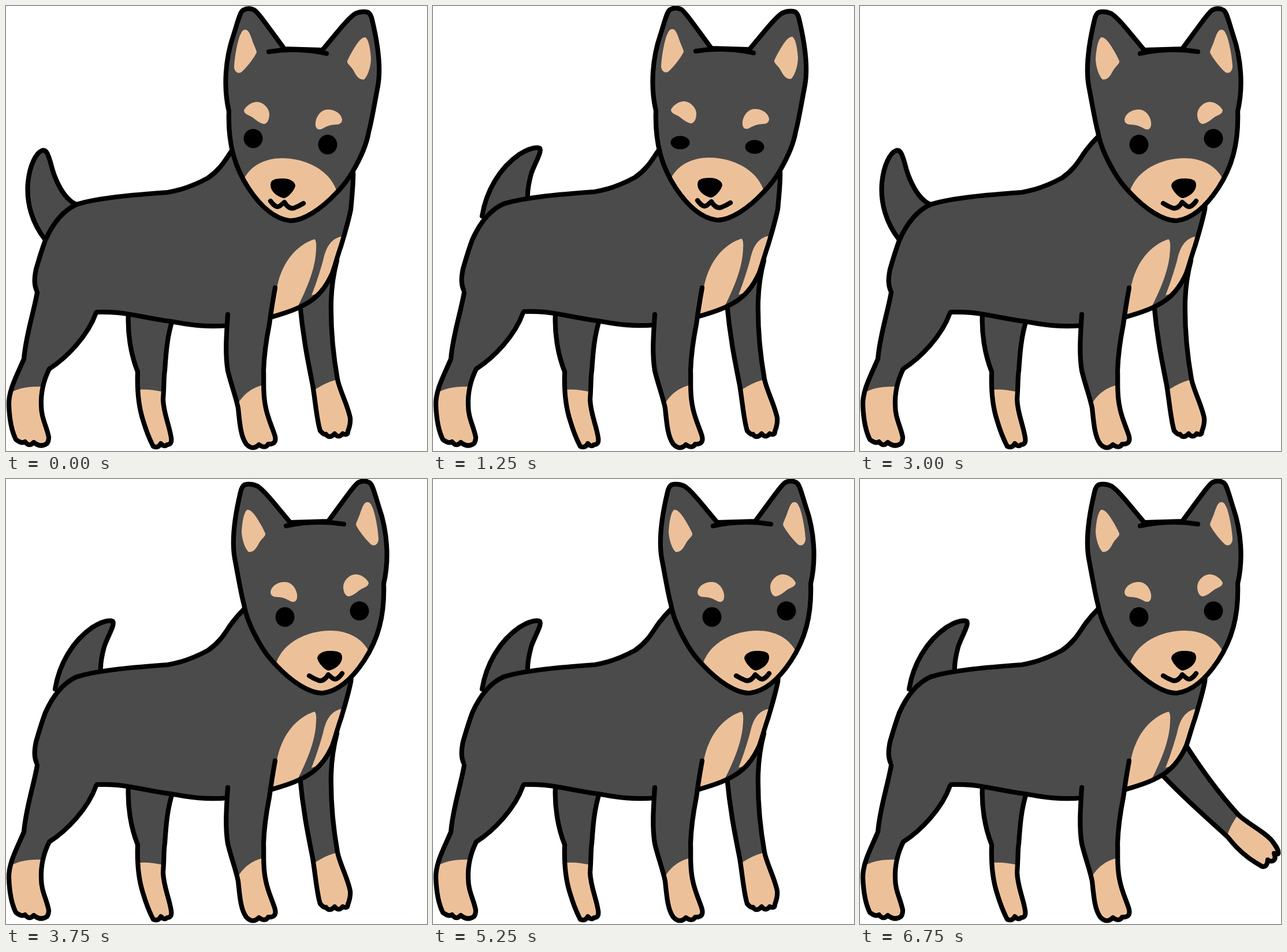
An HTML page that plays this animation: 729 px wide and 769 px high, repeating every 7 s.

```html
<!DOCTYPE html>
<html lang="en">
<head>
<meta charset="utf-8">
<title>Dog</title>
<style>
  html, body { margin: 0; width: 100%; height: 100%; overflow: hidden; background: #fff; }
  svg { display: block; width: 729px; height: 769px; }
  .coat { fill: #4b4b4b; }
  .tan { fill: #ecc19a; }
  .line { fill: none; stroke: #000; stroke-width: 8.2; stroke-linecap: round; stroke-linejoin: round; }
</style>
</head>
<body>
<svg id="stage" viewBox="0 0 729 769"></svg>
<script>
const LOOP = 7000, STEP = 250;
let clips = 0;

// One outlined part: coat fill (plus an unstroked extension), tan markings clipped to it, outline.
function part(d, tan = '', extra = '') {
  const id = 'clip' + clips++;
  return `<clipPath id="${id}"><path d="${d}${extra}z"/></clipPath>
    <path class="coat" d="${d}${extra}z"/>
    <path class="tan" clip-path="url(#${id})" d="${tan}"/>
    <path class="line" d="${d}"/>`;
}

const group = (id, content) => `<g id="${id}">${content}</g>`;
const eye = (x, y, ry) => `<ellipse cx="${x}" cy="${y}" rx="16.5" ry="${ry}"/>`;

const tailDown = part(`M68,404C45,375 35,340 38,305C41,275 52,254 62,250C70,247 73,257 77,270
  C84,300 100,335 124,344`);
const tailUp = part(`M85,363C92,320 115,280 150,256C165,247 178,243 185,246C189,252 176,272 170,290
  C166,305 163,318 164,332`);

const farHindLeg = part(`M212,530C210,565 216,602 228,632C227,660 229,690 237,715
  C243,735 248,748 255,761Q264,765 268,756Q274,763 279,758Q288,758 286,746
  C283,725 273,705 272,680C274,655 273,640 275,630C277,600 279,570 289,540`,
  'M220,664Q250,660 280,669L300,700V769H220z');

const farForeLeg = part(`M509,515C514,570 522,610 531,655C536,685 538,715 544,734
  Q551,742 554,740Q560,749 569,739Q576,748 583,739Q592,743 592,735Q597,722 596,712
  C592,690 578,665 574,645C566,600 562,560 563,510C564,480 569,455 573,440`,
  'M525,670C545,655 560,648 584,643L620,700V769H525z');

const raisedLeg = part(`M560,453C588,498 625,548 656,581C672,596 703,611 714,626
  C720,634 726,642 724,648L717,647C722,658 714,664 706,658C706,667 701,672 695,669
  C687,664 680,660 672,654C655,641 646,630 637,619C598,583 558,549 522,510`,
  'M633,628Q638,600 659,575L729,600V700H630z');

const body = part(`M54,494C48,482 49,470 52,455C57,438 61,424 68,405C80,378 98,354 122,343
  C160,331 225,326 280,322C305,318 328,309 350,297C372,282 380,265 391,250Q400,238 412,226
  L601,287Q602,300 597,352C592,376 586,395 580,415C574,432 570,448 565,462C556,482 545,497 530,508
  C512,521 490,529 458,538L385,552C340,556 310,549 285,545C255,541 235,536 215,533Q190,528 157,529`,
  `M534,403C495,416 472,455 467,500L455,545L505,520C525,480 536,450 537,420Q538,405 534,403z
   M584,398C562,400 553,420 549,440C542,465 535,485 529,500L560,490L600,400z`,
  'L120,550L72,520');

const nearHindLeg = part(`M54,495C48,530 34,570 31,610C18,640 4,665 5,690C6,715 10,735 17,749
  Q27,757 33,753Q40,763 48,754Q60,764 71,756Q74,752 74,745C70,725 61,712 61,690
  C60,665 66,645 75,627C105,608 142,570 156,530`,
  'M0,672C20,660 42,655 75,659L90,700V769H0z', 'L150,505L62,482');

const nearForeLeg = part(`M384,533C382,565 379,600 384,630C390,655 398,675 402,695
  C405,725 407,745 416,757Q427,769 438,758Q449,766 454,757Q469,758 466,744
  C463,732 454,715 450,695C444,670 447,650 446,630C447,600 451,575 456,550Q460,520 466,487`,
  'M398,692C412,670 425,658 455,653L480,700V769H398z');

const skull = `M386,182C376,140 380,90 394,50C402,25 405,10 411,7Q420,2 430,7C437,11 458,42 482,74
  L548,76C570,50 592,21 605,13Q617,8 627,11Q632,14 634,24C645,70 649,110 644,138
  C637,175 633,200 628,218C624,242 612,266 601,285C593,299 584,311 573,322
  C545,352 515,371 492,371C465,368 440,345 420,315C397,280 384,240 386,182`;

const muzzle = 'M410,303C422,275 450,263 478,263C520,263 560,284 572,318L580,390H400z';

const markings = `M413,41C419,40 422,46 426,58C429,68 434,76 434,80C430,90 415,108 408,114
  C402,118 396,114 395,106C396,85 402,55 407,47Q409,42 413,41z
  M622,54C628,57 631,75 632,90C632,105 626,122 620,127C612,128 607,122 602,112
  C597,103 590,100 591,95C596,84 605,68 612,60Q617,54 622,54z
  M412,180C418,170 428,165 437,166C448,168 456,178 456,187C456,195 453,203 447,204
  C439,203 432,196 426,192C420,188 412,187 412,180z
  M536,206C535,196 542,180 556,179C570,178 581,187 582,196C582,202 578,205 570,205
  C560,205 553,209 548,212C542,215 537,213 536,206z`;

const head = part(skull, muzzle + markings) +
  `<path d="M458,309C458,300 466,298 480,298C492,298 501,304 501,311C499,319 488,332 481,332C474,331 458,323 458,309z"/>
   <path class="line" d="M455,79Q505,71 555,82"/>
   <path class="line" d="M458,337Q468,351 475,345L482,339Q490,352 499,349Q507,346 515,341"/>` +
  group('open', eye(428, 229, 16.5) + eye(557, 239.5, 17)) +
  group('shut', eye(428, 237, 11.5) + eye(557, 244.5, 12));

document.getElementById('stage').innerHTML =
  group('tailDown', tailDown) + group('tailUp', tailUp) +
  farHindLeg + group('farForeLeg', farForeLeg) + group('raisedLeg', raisedLeg) +
  group('body', body) +
  '<path d="M105,527L153,531" stroke="#444" fill="none"/>' +
  nearHindLeg + nearForeLeg +
  group('bob', group('turn', head));

// Plays a table of [step, value] rows as hard changes.
function play(id, prop, rows, duration = LOOP) {
  const frames = rows.map(([n, value]) => ({ offset: n * STEP / duration, [prop]: value, easing: 'step-end' }));
  frames.push({ offset: 1, [prop]: rows[rows.length - 1][1] });
  const anim = document.getElementById(id).animate(frames, { duration, iterations: Infinity });
  anim.startTime = 0;
}

const WAG = 2 * STEP;
play('tailDown', 'opacity', [[0, 1], [1, 0]], WAG);
play('tailUp', 'opacity', [[0, 0], [1, 1]], WAG);
for (const id of ['body', 'bob']) {
  play(id, 'transform', [[0, 'translate(0px, 0px)'], [1, 'translate(0px, -1px)']], WAG);
}
play('open', 'opacity', [[0, 1], [5, 0], [6, 1]]);
play('shut', 'opacity', [[0, 0], [5, 1], [6, 0]]);
play('turn', 'transform', [[0, 'matrix(1, 0, 0, 1, 0, 0)'], [10, 'matrix(-1, 0, 0, 1, 1040, 0)']]);
play('farForeLeg', 'opacity', [[0, 1], [25, 0]]);
play('raisedLeg', 'opacity', [[0, 0], [25, 1]]);
</script>
</body>
</html>
```
